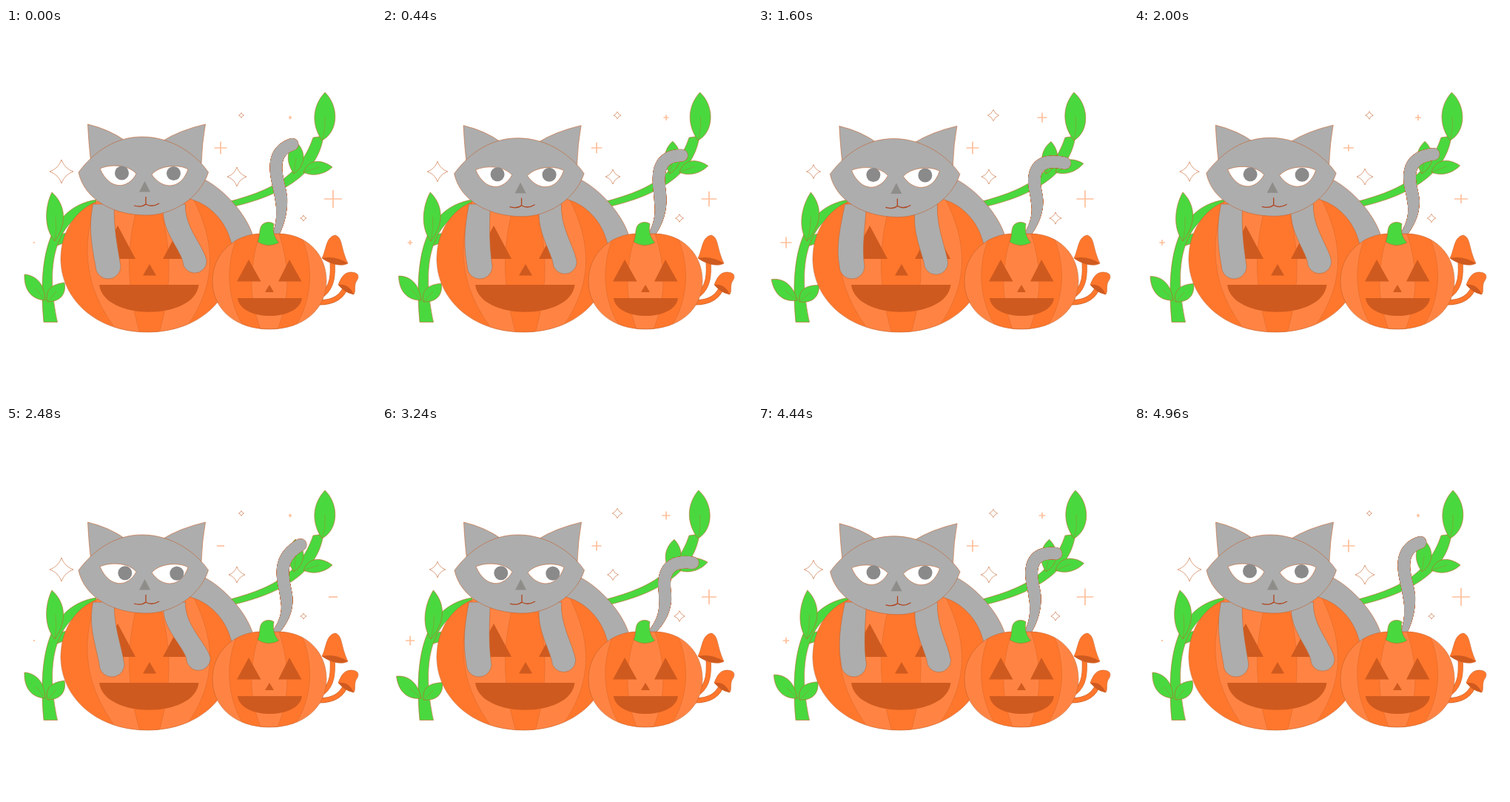
An HTML page with a canvas for the animation above (5 s loop, 500 px wide and 500 px high).

```html
<!DOCTYPE html>
<html lang="en">
<head>
<meta charset="utf-8">
<title>Cat on pumpkins</title>
<style>
  html, body { margin: 0; height: 100%; overflow: hidden; background: #fff; }
  canvas { display: block; width: 500px; height: 500px; }
</style>
</head>
<body>
<canvas id="stage" width="500" height="500"></canvas>
<script>
const ctx = document.getElementById('stage').getContext('2d');
const LOOP = 5000;
const LINE = '#c4622c', GREY = '#adadad', GREEN = '#4ad83f';
const ORANGE = '#ff772c', LIGHT = '#ff8443', DARK = '#cf5a1f', PALE = '#ffc09c';

function shape(d, fill, line = LINE, width = 0.6) {
  const path = new Path2D(d);
  if (fill) { ctx.fillStyle = fill; ctx.fill(path); }
  if (line) { ctx.strokeStyle = line; ctx.lineWidth = width; ctx.stroke(path); }
}

function at(x, y, degrees, paint) {
  ctx.save();
  ctx.translate(x, y);
  ctx.rotate(degrees * Math.PI / 180);
  ctx.translate(-x, -y);
  paint();
  ctx.restore();
}

// Smooth looping curve through the values reached at KEYS
const KEYS = [0, 920, 1600, 2480, 3240, 3920];
function keyed(t, values) {
  const n = KEYS.length;
  const time = i => KEYS[(i + n) % n] + LOOP * Math.floor(i / n);
  const value = i => values[(i + n) % n];
  const slope = i => (value(i + 1) - value(i - 1)) / (time(i + 1) - time(i - 1));
  let i = n - 1;
  while (KEYS[i] > t) i--;
  const span = time(i + 1) - time(i), u = (t - time(i)) / span, v = 1 - u;
  return v * v * (1 + 2 * u) * value(i) + u * u * (3 - 2 * u) * value(i + 1)
    + span * u * v * (v * slope(i) - u * slope(i + 1));
}

const smooth = (a, b, t) => {
  const u = Math.min(1, Math.max(0, (t - a) / (b - a)));
  return u * u * (3 - 2 * u);
};

function leaf(x, y, degrees, outline, vein) {
  at(x, y, degrees, () => {
    shape(outline, GREEN);
    if (vein) shape(vein, null, '#8a9a30');
  });
}

function vines(sway) {
  leaf(62, 297, 3 * sway, 'M62 297C62 281 76 275 92 278C86 291 74 291 62 297Z');
  shape('M51 397.500C45 330 48 244 122 232L122 242C62 262 54 325 69.500 397.500Z', GREEN);
  shape('M296 236C350 222 396 205 415 148L429 146C423 188 390 224 296 244Z', GREEN);
  leaf(66, 288, 10 * sway, 'M66 288C50 270 53 240 62 222C82 240 82 265 66 288Z', 'M66 288Q69 272 67 255');
  leaf(53, 368, -15 * sway, 'M53 368C52 345 40 334 25 333C24 352 33 367 53 368Z', 'M53 368L40 352');
  leaf(56, 370, 10 * sway, 'M56 370C52 352 64 346 79 344C82 360 73 370 56 370Z', 'M56 370L68 356');
  leaf(389, 197, 8 * sway, 'M389 197C377 180 380 164 391 153C406 166 406 185 389 197Z', 'M389 197L392 176');
  leaf(402, 195, -9 * sway, 'M402 195C408 178 425 176 441 188C428 200 412 200 402 195Z', 'M402 195L423 188');
  leaf(427, 152, -4.5 * sway, 'M431 87C414 105 412 130 427 152C450 140 450 105 431 87Z', 'M427 152Q432 138 431 120');
}

function mushrooms() {
  const stems = ['M428 360C442 349 442 332 441 314', 'M422 371C445 371 455 362 460 348'];
  for (const d of stems) { shape(d, null, LINE, 7); shape(d, null, ORANGE, 6); }
  shape('M445 280C455 283 452 297 462 318C452 324 436 317 427 311C433 300 432 282 445 280Z', ORANGE);
  shape('M427 311Q445 307 462 318Q444 324 427 311Z', DARK, null);
  shape('M449 347C452 340 455 331 465 330C479 330 477 338 473 343C470 350 473 355 470 360C460 358 455 353 449 347Z', ORANGE);
  shape('M449 347Q463 345 470 360Q458 358 449 347Z', DARK, null);
}

function pumpkin(body, bands, colours, face) {
  ctx.save();
  ctx.clip(new Path2D(body));
  shape(body, colours[0], null);
  bands.forEach((d, i) => shape(d, colours[1 - i % 2], '#e0692a'));
  ctx.restore();
  shape(body, null);
  shape(face, DARK, null);
}

function bigPumpkin() {
  pumpkin(
    'M191 411C120 411 74 365 74 312C74 262 110 229 150 229L232 229C272 229 307 265 307 312C307 365 262 411 191 411Z',
    ['M125 225C103 285 100 345 152 412H238C290 345 282 285 250 225Z',
     'M182 225C162 290 161 345 181 412H207C226 345 224 290 203 225Z'],
    [ORANGE, LIGHT],
    'M151 267L175 312H127ZM236 267L260 312H212ZM194 319L203 334.500H185ZM126 347H260.500C255 396 132 396 126 347Z');
}

function smallPumpkin() {
  pumpkin(
    'M356 407C310 407 279 380 279 342C279 304 310 278 345 278H368C405 278 433 304 433 342C433 380 402 407 356 407Z',
    ['M314 278C296 320 297 365 323 407H389C416 365 416 320 398 278Z',
     'M343 278C328 325 328 365 344 407H367C384 365 384 325 369 278Z'],
    [LIGHT, ORANGE],
    'M328 313L344.500 342.500H312ZM383 313L399.500 342.500H368ZM356 347L362 357H350ZM313 365H400C396 397 317 397 313 365Z');
  shape('M340 289C344 281 341 270 347 265Q354 260 362 264.500C360 275 363 284 369 290Q354 298 340 289Z', GREEN);
}

// Each row is one coordinate of the tail curve: bend, middle, upper bend, tip
const TAIL = [
  [374, 382, 379, 382, 382, 380], [256, 258, 255, 255, 258, 256],
  [374, 382, 379, 381, 384, 380], [236, 245, 240, 240, 243, 240],
  [369, 382, 375, 377, 382, 377], [215, 222, 220, 220, 222, 220],
  [358, 391, 372, 368, 384, 378], [166, 179, 173, 177, 180, 173],
  [388, 430, 416, 399, 421, 424], [157, 193, 183, 160, 185, 191]
];

function tail(t) {
  const [ax, ay, bx, by, mx, my, cx, cy, ex, ey] = TAIL.map(row => keyed(t, row));
  const cubic = (a, b, c, d, u) =>
    (1 - u) ** 3 * a + 3 * u * (1 - u) ** 2 * b + 3 * u * u * (1 - u) * c + u ** 3 * d;
  for (const [extra, colour] of [[0.5, LINE], [0, GREY]]) {
    ctx.fillStyle = colour;
    for (let s = 0; s <= 2; s += 0.01) {
      const u = s % 1, lower = s < 1;
      const x = lower ? cubic(365, ax, bx, mx, u) : cubic(mx, 2 * mx - bx, cx, ex, u);
      const y = lower ? cubic(278, ay, by, my, u) : cubic(my, 2 * my - by, cy, ey, u);
      ctx.beginPath();
      ctx.arc(x, y, 4 + 4 * Math.min(1, s * 1.3) + extra, 0, 7);
      ctx.fill();
    }
  }
}

function arm(shoulder, x, y, r) {
  shape(`M${shoulder - 14.5} 238C${shoulder - 21} 270 ${x - 22} 295 ${x - r} ${y}
    A${r} ${r} 0 0 0 ${x + r} ${y}C${x + 13} 295 ${shoulder + 13} 270 ${shoulder + 14.5} 238Z`, GREY);
}

function head(t) {
  const drop = keyed(t, [0, 4, 2.5, 0, 0, 3.5]);
  const look = smooth(1850, 2350, t) - smooth(3300, 3800, t);
  ctx.save();
  ctx.translate(-drop / 4, drop);
  shape('M110.500 130Q112 160 115 183L162 153Q140 137 110.500 130Z', GREY);
  shape('M269.500 130Q265 155 264 183L211 153Q235 138 269.500 130Z', GREY);
  shape('M98 195C120 165 150 147 184 147C225 147 258 172 273.500 195C262 230 225 253 190 253C145 253 106 232 98 195Z', GREY);
  shape('M127 190C140 184 165 184 176 197C165 218 140 220 127 190Z', '#fff');
  shape('M246 191C235 184 208 185 197 198C210 218 236 220 246 191Z', '#fff');
  ctx.fillStyle = '#8a8a8a';
  for (const [x, y] of [[156.5, 196], [226.5, 196.5]]) {
    ctx.beginPath();
    ctx.arc(x + 4.3 * look, y + 2.7 * look, 9.5, 0, 7);
    ctx.fill();
  }
  shape('M187.500 207L195 221.500H180Z', '#8f8d8a', null);
  shape('M189 228V238Q183 243 173 240M189 238Q197 243 207 237', null, '#b0441f', 1.3);
  ctx.restore();
}

function star(x, y, r) {
  const k = r * 0.25;
  shape(`M${x} ${y - r}Q${x + k} ${y - k} ${x + r} ${y}Q${x + k} ${y + k} ${x} ${y + r}
    Q${x - k} ${y + k} ${x - r} ${y}Q${x - k} ${y - k} ${x} ${y - r}Z`, '#fff');
}

function plus(x, y, rx, ry = rx) {
  shape(`M${x - rx} ${y}H${x + rx}M${x} ${y - ry}V${y + ry}`, null, PALE, 1.7);
}

function sparkles(t, sway) {
  star(75, 194, 16 - 8 * sway);
  star(312, 201, keyed(t, [13, 6.3, 10, 11, 7.3, 8]));
  star(318, 118, 3.5 + 5 * sway);
  star(402, 257, 4 + 5 * sway);
  plus(384, 121, 2.2 + 5.2 * sway);
  plus(38, 290, 1 + 8 * sway);
  plus(290, 162, keyed(t, [8.5, 6, 8.5, 5, 6.5, 7]), Math.max(0, keyed(t, [8.5, 6, 8.5, 0, 6.5, 7])));
  plus(442, 231, keyed(t, [12, 8.5, 11.5, 6, 10, 10]), Math.max(0, keyed(t, [12, 8.5, 11.5, 0, 10, 10])));
}

function frame(now) {
  const t = now % LOOP;
  const sway = (1 - Math.cos(t / LOOP * 4 * Math.PI)) / 2;
  ctx.fillStyle = '#fff';
  ctx.fillRect(0, 0, 500, 500);
  sparkles(t, sway);
  vines(sway);
  mushrooms();
  shape('M262 202C290 213 325 250 334 282L300 330L240 240Z', GREY);
  tail(t);
  bigPumpkin();
  smallPumpkin();
  arm(132, keyed(t, [138, 123.5, 127, 143, 131, 121]), 322, 17);
  const paw = keyed(t, [255, 235.5, 240.5, 260, 245.5, 233.5]);
  arm(228, paw, 318 - 0.15 * (paw - 234), 16.3);
  head(t);
  requestAnimationFrame(frame);
}
requestAnimationFrame(frame);
</script>
</body>
</html>
```
